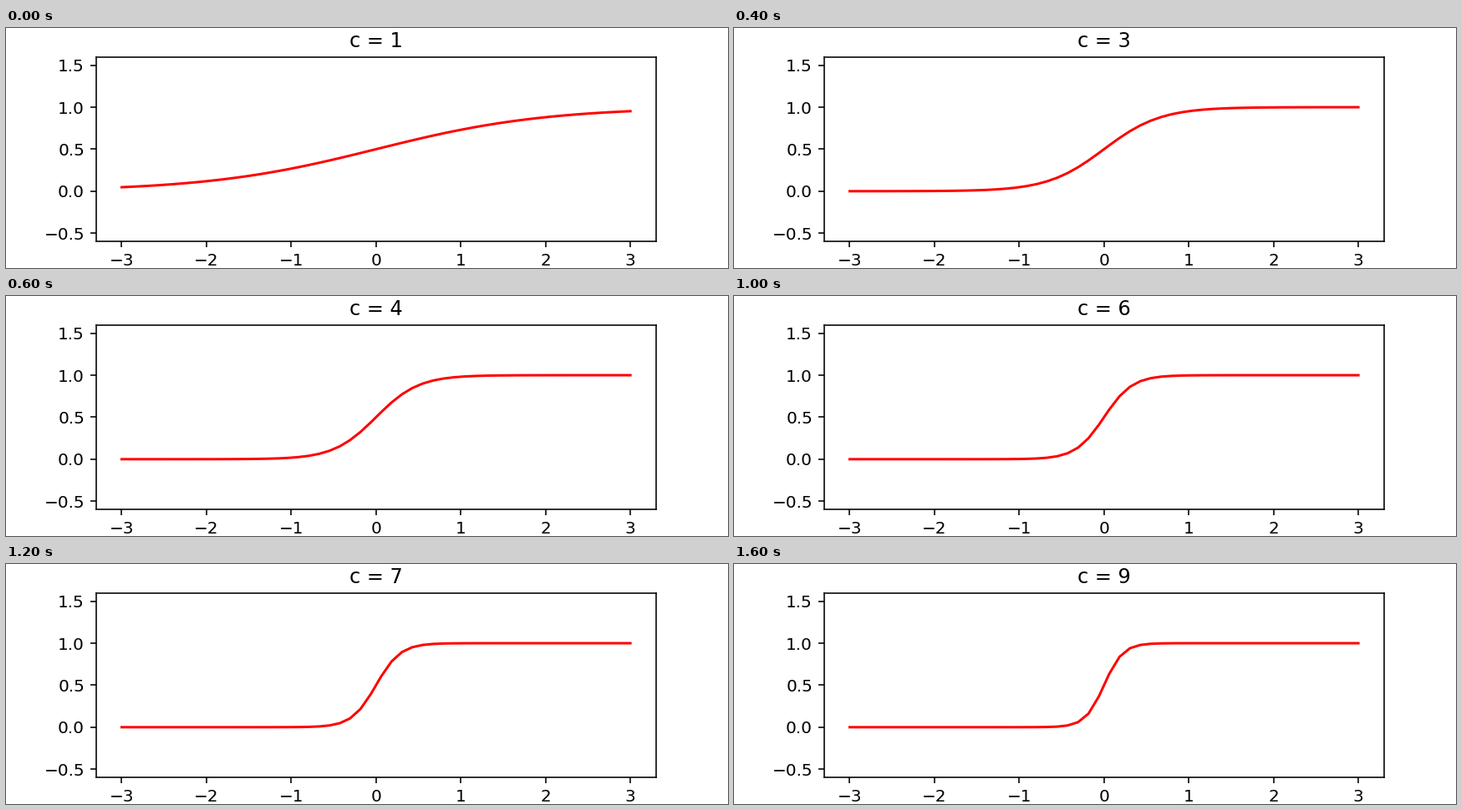
A matplotlib script that plays this animation: 864 px wide and 288 px high, repeating every 1800 ms.

```python
import numpy as np
import matplotlib.pyplot as plt
from matplotlib.animation import FuncAnimation

STEPS = 9
INTERVAL = 200  # ms

plt.rcParams["font.family"] = "DejaVu Sans"

x = np.linspace(-3, 3, 50)


def sigmoid(x, c):
    return 1 / (1 + np.exp(-c * x))


fig, ax = plt.subplots(figsize=(6, 2), dpi=144)
line, = ax.plot(x, sigmoid(x, 1), color="red", lw=1.5)
ax.set_xlim(-3.3, 3.3)
ax.set_ylim(-0.6, 1.6)
ax.set_xticks(range(-3, 4))
ax.set_yticks(np.arange(-0.5, 2, 0.5))
title = ax.set_title("c = 1")


def update(step):
    c = step + 1
    line.set_ydata(sigmoid(x, c))
    title.set_text(f"c = {c}")
    return line, title


anim = FuncAnimation(fig, update, frames=STEPS, interval=INTERVAL,
                     repeat=True, repeat_delay=0, blit=False)
plt.show()
```
